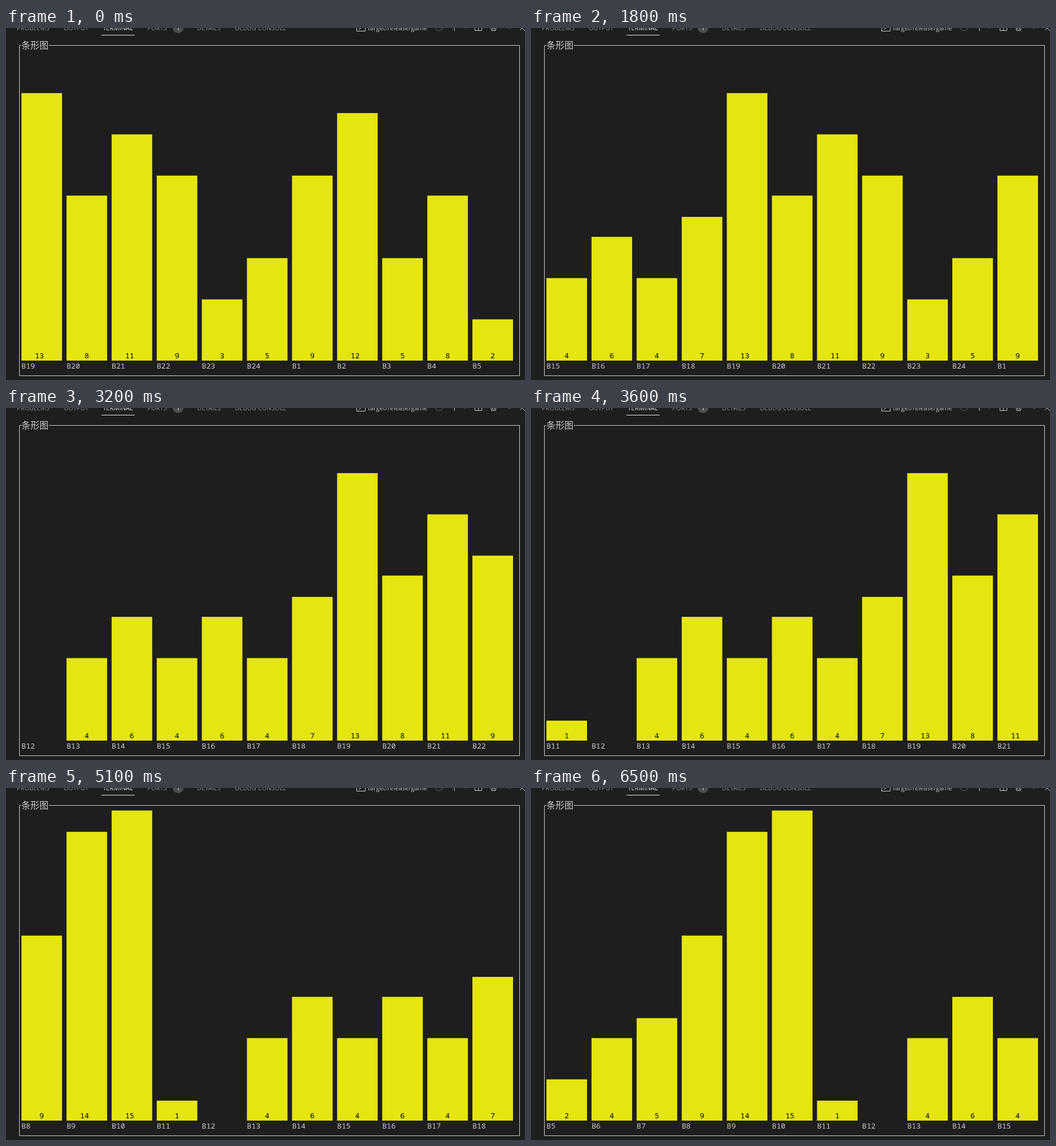
Write an HTML page with a canvas that moves like this. It is 908 px wide and 617 px high and loops after 6.8 s.

```html
<!DOCTYPE html>
<html lang="zh">
<head>
<meta charset="utf-8">
<title>条形图</title>
<style>
  html, body { margin: 0; width: 100%; height: 100%; overflow: hidden; background: #1e1e1e; }
  canvas { display: block; }
</style>
</head>
<body>
<canvas id="stage" width="908" height="617"></canvas>
<script>
const ctx = document.getElementById('stage').getContext('2d');
const LOOP = 6800, CELL = 7.89, COLUMNS = 11, LEFT = 27, BASE = 583;
const FULL = 543.5, UNITS = 233, MAX = 15;
const INK = '#cccccc';
const MONO = '13.15px "Noto Sans Mono", "DejaVu Sans Mono", monospace';
const UI = '11px "Open Sans", "Noto Sans", sans-serif';
const CJK = '300 15.8px "Noto Sans CJK SC", "Noto Sans CJK", sans-serif';

// Values of bars B1 to B24; the row shifts right by one bar at each step.
const values = [9, 12, 5, 8, 2, 4, 5, 9, 14, 15, 1, 0, 4, 6, 4, 6, 4, 7, 13, 8, 11, 9, 3, 5];
const steps = [500, 900, 1400, 1800, 2500, 2800, 3200, 3600, 4300, 4600, 5100, 5500, 5900, 6500];
const FIRST = 18;

// Heights snap down to whole terminal units.
const barHeight = value => Math.floor(value * UNITS / MAX) * FULL / UNITS;

function text(str, x, y, color, font) {
  ctx.fillStyle = color;
  ctx.font = font;
  ctx.fillText(str, x, y);
  return ctx.measureText(str).width;
}

function stroke(path, color = INK) {
  ctx.strokeStyle = color;
  ctx.stroke(new Path2D(path));
}

function circle(x, y, r, color) {
  ctx.beginPath();
  ctx.arc(x, y, r, 0, Math.PI * 2);
  ctx.fillStyle = color;
  ctx.fill();
}

function drawTabs() {
  let x = 19;
  for (const name of ['PROBLEMS', 'OUTPUT', 'TERMINAL', 'PORTS', 'DETAILS', 'DEBUG CONSOLE']) {
    const active = name === 'TERMINAL';
    const width = text(name, x, 4, active ? '#e7e7e7' : '#8f8f8f', UI);
    if (active) ctx.fillRect(Math.round(x) - 2, 12, 58, 1);
    x += width + 25;
    if (name === 'PORTS') {
      circle(301, -0.5, 9.5, '#4d4d4d');
      text('1', 298, 4, '#f0f0f0', UI);
      x += 28;
    }
  }
}

function drawTools() {
  stroke('M613.5 -4V5.5h15V-4 M617 -3l4 3l-4 3');
  text('target/release/game', 633, 4, INK, UI);
  circle(757.5, -1, 6.5, '#626262');
  circle(757.5, -1, 5.5, '#1e1e1e');
  stroke('M784.5 -2V5');
  stroke('M820.5 -4V4.5h12V-4 M826.5 -4V4.5');
  stroke('M848.5 -4l1 8.5h7l1 -8.5 M851.5 -4V3 M854.5 -4V3');
  stroke('M899 4l6 -6 M903 0l5 5');
  stroke('M799 -2l3 2.5l3 -2.5 M877 -2l3.5 3l3.5 -3', '#808080');
}

function drawBorder() {
  stroke('M26.5 30.5H23.5V609.5H898.5V30.5H75');
  text('条形图', LEFT, 36, INK, CJK);
}

function drawBar(column, index) {
  const x = LEFT + column * CELL * 10;
  const value = values[index];
  text('B' + (index + 1), x, 597, INK, MONO);
  if (!value) return;
  const height = barHeight(value);
  ctx.fillStyle = '#e5e510';
  ctx.fillRect(x, BASE - height, CELL * 9, height);
  const label = String(value);
  text(label, x + CELL * Math.floor((9 - label.length) / 2), 579, '#000', MONO);
}

function draw(time) {
  const t = time % LOOP;
  const first = FIRST - steps.filter(s => t >= s).length;
  ctx.fillStyle = '#1e1e1e';
  ctx.fillRect(0, 0, 908, 617);
  drawTabs();
  drawTools();
  drawBorder();
  for (let i = 0; i < COLUMNS; i++) drawBar(i, (first + i) % values.length);
}

const start = performance.now();
function tick() {
  draw(performance.now() - start);
  requestAnimationFrame(tick);
}
tick();
</script>
</body>
</html>
```
